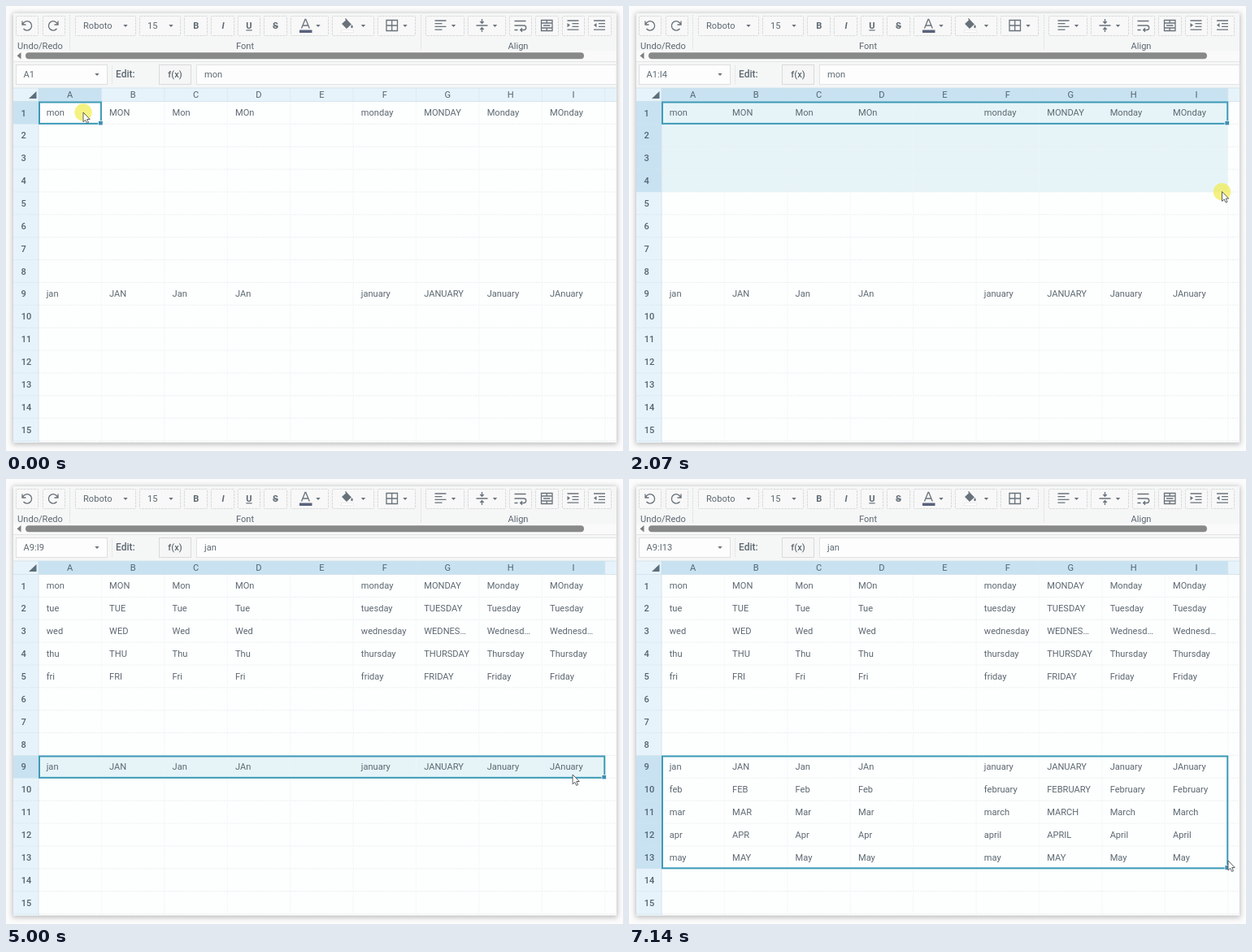
An HTML page for the animation above (7.2 s loop, 759 px wide and 548 px high).

```html
<!DOCTYPE html>
<html lang="en">
<head>
<meta charset="utf-8">
<title>Spreadsheet autofill</title>
<style>
html, body { margin: 0; width: 100%; height: 100%; overflow: hidden; background: #fcfcfc; }
svg { display: block; width: 100vw; height: 100vh; }
text { font-family: Roboto, sans-serif; font-size: 11.1px; fill: #5d6871; white-space: pre; }
.mid { text-anchor: middle; }
.head { fill: #53636f; font-weight: 500; }
.icon { fill: none; stroke: #69727b; stroke-width: 1.3; }
</style>
</head>
<body>
<svg id="stage" viewBox="0 0 759 548"></svg>
<script>
const NS = 'http://www.w3.org/2000/svg';
const stage = document.getElementById('stage');
const LEFT = 40, TOP = 117.5, COL = 77.42, ROW = 27.87, ROWS = 15;
const LETTERS = 'ABCDEFGHI';
const LOOP = 7200;

function el(tag, attrs, parent = stage, text) {
  const node = document.createElementNS(NS, tag);
  set(node, attrs);
  if (text !== undefined) node.textContent = text;
  parent.appendChild(node);
  return node;
}
function set(node, attrs) {
  for (const k in attrs) node.setAttribute(k, attrs[k]);
}
const rect = (x, y, width, height, fill, more = {}, parent) =>
  el('rect', { x, y, width, height, fill, ...more }, parent);
const text = (x, y, str, more = {}, parent) => el('text', { x, y, ...more }, parent, str);
const icon = (d, more = {}) => el('path', { d, class: 'icon', ...more });
const show = (node, on) => set(node, { visibility: on ? 'visible' : 'hidden' });
const colX = c => LEFT + c * COL;
const rowY = r => TOP + (r - 1) * ROW;
const clamp = (v, lo, hi) => Math.max(lo, Math.min(hi, v));

// Window
const defs = el('defs', {});
const blur = el('filter', { id: 'blur', x: '-5%', y: '-5%', width: '110%', height: '110%' }, defs);
el('feGaussianBlur', { stdDeviation: 3 }, blur);
const clip = el('clipPath', { id: 'sheet' }, defs);
rect(9, 9, 742, 528.5, '#000', {}, clip);
rect(8, 9, 744, 531, '#bcbcbc', { filter: 'url(#blur)' });
rect(9, 9, 742, 528.5, '#fdfefe');
rect(9, 9, 742, 92, '#f5f6f6');

// Toolbar
const caret = (x, y = 23) => el('path', { d: `M${x - 2.7} ${y}h5.4l-2.7 2.9z`, fill: '#69727b' });
const button = (x1, x2) => rect(x1 + .5, 12.5, x2 - x1 - 1, 24, '#f8f8f8',
  { stroke: '#d9dadb', 'stroke-dasharray': '3 1', rx: 1 });
[[12, 40], [45, 73], [85, 160], [164, 215], [219, 248], [252, 281], [285, 313], [317, 346],
 [350, 397], [401, 453], [457, 504], [516, 564], [568, 615], [619, 647], [651, 680],
 [684, 712], [716, 745]].forEach(b => button(...b));
[78.5, 510.5].forEach(x => el('path', { d: `M${x} 11V54`, stroke: '#dedfe0', 'stroke-dasharray': '2 1' }));
[147, 203, 384, 439.5, 491, 550.5, 601.5].forEach(x => caret(x));
[[42, 'Undo/Redo'], [294, 'Font'], [630, 'Align']].forEach(([x, s]) => text(x, 52.5, s, { class: 'mid' }));
text(95, 28, 'Roboto');
text(174, 28, '15');
const style = (x, s, more) => text(x, 28.3, s, { class: 'mid', 'font-weight': 700, ...more });
style(233.7, 'B');
style(267, 'I', { 'font-style': 'italic' });
style(299, 'U', { 'text-decoration': 'underline' });
style(331.5, 'S', { 'text-decoration': 'line-through' });

icon('M20 18.5v4.5h4.5M20.5 22.5a5.7 5.7 0 1 1 1 5.5');
icon('M64 18.5v4.5h-4.5M63.5 22.5a5.7 5.7 0 1 0-1 5.5');
icon('M363.5 27.5L368 16.5h.8L373.300 27.5M365 24h7');
rect(361, 29.5, 15.5, 3.5, '#59627c');
icon('M414 22l5-4.500 5 5-5 4.500zM417.500 15.500l3 3.500', { style: 'fill:#69727b' });
el('path', { d: 'M425.500 23q2.500 3.500 0 4.200q-2.500-.7 0-4.200', fill: '#69727b' });
rect(412.5, 29.5, 15, 3.2, '#fff', { stroke: '#e3e3e3', 'stroke-width': .6 });
icon('M468 17.500h13.500v13H468zM474.700 17.500v13M468 24h13.500');
icon('M527.500 18h14M527.500 21.700h9M527.500 25.400h14M527.500 29.100h9');
icon('M578.500 24h14M585.500 16v5M585.500 32v-5M583.300 19l2.200 2.300 2.200-2.300M583.300 29l2.200-2.300 2.200 2.300');
icon('M625.500 18.500h14M625.500 24h11.500a2.700 2.700 0 0 1 0 5.500h-4M635 27.300l-2.300 2.200 2.300 2.200M625.500 29.500h4');
icon('M658.500 17.500h13.500v13h-13.500zM658.500 21h13.500M658.500 27h13.500M665.200 17.500v3.500M665.200 27v3.500M661 24h8.500');
const indent = (x, arrow) => {
  icon(`M${x} 18h14M${x + 6} 21.700h8M${x + 6} 25.400h8M${x} 29.100h14`);
  el('path', { d: arrow, fill: '#69727b' });
};
indent(690.5, 'M690.500 21l3.500 2.600-3.500 2.600z');
indent(723, 'M726.500 21l-3.500 2.600 3.500 2.600z');

// Scroll bar and formula bar
rect(9, 55, 742, 13, '#fafafa');
el('path', { d: 'M18.500 57v8.500l-5-4.250z', fill: '#7d7d7d' });
rect(24, 57.300, 687, 8, '#888989', { rx: 4 });
el('path', { d: 'M9 68.500H751', stroke: '#e4e5e6' });
rect(12.5, 72.5, 112, 24, '#fdfdfd', { stroke: '#dedfe0' });
caret(112);
set(stage.lastChild, { transform: 'translate(0 60)' });
el('path', { d: 'M130.500 73V97', stroke: '#e1e2e3', 'stroke-dasharray': '2 1' });
text(135, 88.3, 'Edit:', { style: 'font-size:12px;font-weight:500' });
rect(188.5, 72.5, 39, 24, '#f6f6f6', { stroke: '#d9dadb' });
text(208, 88.3, 'f(x)', { class: 'mid', 'font-weight': 500 });
rect(234.5, 72.5, 516.5, 24, '#fdfdfd', { stroke: '#e2e3e4' });
const nameText = text(21.5, 88.3, '');
const valueText = text(244, 88.3, '');

// Sheet
const sheet = el('g', { 'clip-path': 'url(#sheet)' });
rect(9, 101, 742, 16.5, '#e7f3fa', {}, sheet);
rect(9, TOP, 31, 421, '#e7f3fa', {}, sheet);
const colMark = rect(LEFT, 101, COL, 16.5, '#c8e2f1', {}, sheet);
const rowMark = rect(9, TOP, 31, ROW, '#c8e2f1', {}, sheet);
const shade = rect(LEFT, TOP, COL, ROW, '#e6f4f8', {}, sheet);
const line = (d, stroke, dash = '2 1') =>
  el('path', { d, stroke, 'stroke-dasharray': dash, 'stroke-width': .8, fill: 'none' }, sheet);
for (let r = 2; r <= ROWS + 1; r++) {
  line(`M${LEFT} ${rowY(r)}H751`, '#e7ecef');
  line(`M9 ${rowY(r)}H${LEFT}`, '#d3e5ef');
}
for (let c = 1; c <= 9; c++) {
  line(`M${colX(c)} ${TOP}V538`, '#f0f4f6');
  line(`M${colX(c)} 101V${TOP}`, '#d0e3ee');
}
line(`M9 101H751M9 ${TOP}H751M${LEFT} 101V538`, '#cfe0ea', 'none');
el('path', { d: 'M37.500 105v9h-9.500z', fill: '#5c6f7d' }, sheet);
[...LETTERS].forEach((s, c) => text(colX(c + .5), 113.4, s, { class: 'mid head', style: 'font-weight:400' }, sheet));
for (let r = 1; r <= ROWS; r++) text(r < 10 ? 21.7 : 25, rowY(r) + 18, r, { class: 'mid head' }, sheet);

const days = ['monday', 'tuesday', 'wednesday', 'thursday', 'friday'];
const months = ['january', 'february', 'march', 'april', 'may'];
const upper = s => s.toUpperCase();
const title = s => upper(s[0]) + s.slice(1);
const odd = (s, i) => i ? title(s) : upper(s.slice(0, 2)) + s.slice(2);
const cases = [s => s, upper, title, odd];
const fit = s => ({ WEDNESDAY: 'WEDNES…', Wednesday: 'Wednesd…' })[s] || s;

// Writes one series; returns the group holding the rows added by the fill
function series(words, top) {
  const first = el('g', {}, sheet), rest = el('g', {}, sheet);
  words.forEach((word, i) => [0, 5].forEach(start => cases.forEach((fn, k) => {
    const s = start ? word : word.slice(0, 3);
    text(colX(start + k) + 9.7, rowY(top + i) + 17.8, fit(fn(s, i)), {}, i ? rest : first);
  })));
  return rest;
}
const phases = [
  { row: 1, value: 'mon', drag: 70, pick: 840, pull: 1450, fill: 2220, rest: series(days, 1) },
  { row: 9, value: 'jan', drag: 3550, pick: 4520, pull: 5670, fill: 6410, rest: series(months, 9) }
];
const SECOND = 3020;

const border = rect(0, 0, 0, 0, 'none', { stroke: '#3c9ab7', 'stroke-width': 2 }, sheet);
const knob = rect(0, 0, 5.5, 5.5, '#3f8fb0', { stroke: '#fff', 'stroke-width': .7 }, sheet);

// Pointer
const pointer = el('g', {});
const halo = el('circle', { r: 10.7, fill: '#f1ec3f', opacity: .66 }, pointer);
const arrow = el('path', { d: 'M0 0V11.800L2.700 9.300L4.600 13.400L6.500 12.500L4.700 8.500H8.200Z',
  fill: '#fff', stroke: '#4c5054', 'stroke-width': .9 }, pointer);
const cross = el('path', { d: 'M-8.500 0H8.500M0-8V8', stroke: '#4a4a3c', 'stroke-width': 1.4 }, pointer);

// time, x, y
const path = [
  [0, 95, 131], [70, 97, 131], [770, 700, 132], [840, 702, 133], [1170, 735.5, 146],
  [1590, 735.5, 146], [2070, 729.5, 228.5], [2150, 730, 240], [2290, 730, 244], [2690, 730, 244],
  [2820, 62, 350], [3020, 47, 354], [3090, 44.5, 355], [3550, 44.5, 355], [4100, 604.5, 365],
  [4240, 690, 366], [4520, 697, 364], [5000, 697, 364], [5410, 735.5, 368], [5670, 735.5, 368],
  [5800, 733.5, 375], [6340, 737, 468], [6480, 737, 470], [LOOP, 737, 470]
];
function tip(t) {
  const i = Math.max(1, path.findIndex(p => p[0] > t));
  const a = path[i - 1], b = path[i];
  const k = (t - a[0]) / (b[0] - a[0]);
  return [a[1] + (b[1] - a[1]) * k, a[2] + (b[2] - a[2]) * k];
}
const within = (t, spans) => spans.some(([a, b]) => t >= a && t < b);
const pressed = [[0, 840], [1450, 2290], [3290, 4860], [5670, 6480]];
const onKnob = [[1100, 1650], [5340, 5700]];

function place(node, row, cols, rows, inset = 0) {
  set(node, { x: LEFT + inset, y: rowY(row) + inset, width: cols * COL - inset * 1.5, height: rows * ROW - inset * 1.5 });
}

function draw(t) {
  const p = phases[t < SECOND ? 0 : 1];
  const [x, y] = tip(t);
  const rowsAt = at => clamp(Math.floor((at - 1.5 - rowY(p.row)) / ROW) + 1, 1, 5);
  const picked = t >= p.pick, pulling = t >= p.pull, filled = t >= p.fill;
  const cols = picked ? 9 : t < p.drag ? 1 : clamp(Math.floor((x - LEFT) / COL) + 1, 1, 9);
  const rows = filled ? 5 : pulling ? rowsAt(y) : 1;
  // row headers follow the pointer slightly late
  const headRows = filled ? 5 : pulling ? rowsAt(tip(t - 130)[1]) : 1;
  const boxCols = picked ? 9 : 1, boxRows = filled ? 5 : 1;

  set(colMark, { width: cols * COL });
  place(rowMark, p.row, 1, headRows);
  set(rowMark, { x: 9, width: 31 });
  place(shade, p.row, cols, rows);
  show(shade, !filled && cols > 1);
  place(border, p.row, boxCols, boxRows, 1);
  set(knob, { x: colX(boxCols) - 3.8, y: rowY(p.row + boxRows) - 4 });

  const end = cols * rows > 1 ? ':' + LETTERS[cols - 1] + (p.row + rows - 1) : '';
  nameText.textContent = 'A' + p.row + end;
  valueText.textContent = p.value;
  phases.forEach(q => show(q.rest, t >= q.fill));

  const crossed = within(t, onKnob);
  set(pointer, { transform: `translate(${x.toFixed(2)} ${y.toFixed(2)})` });
  show(halo, within(t, pressed));
  show(cross, crossed);
  show(arrow, !crossed);
}

const began = performance.now();
function tick() {
  draw((performance.now() - began) % LOOP);
  requestAnimationFrame(tick);
}
tick();
</script>
</body>
</html>
```
